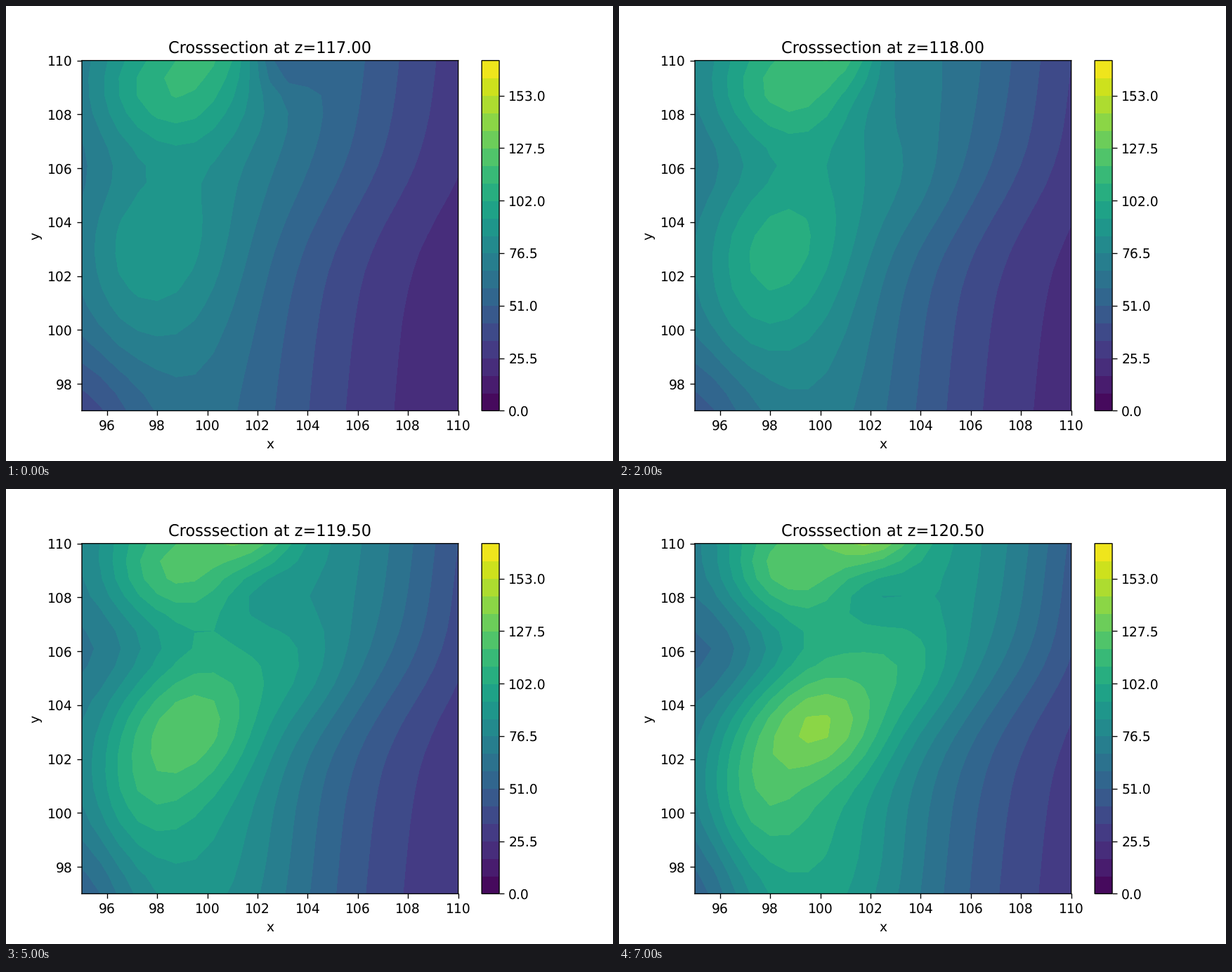
Animation, 864 px wide and 648 px high, one loop 8 s. Source, as a matplotlib script:

```python
import numpy as np
import matplotlib.pyplot as plt
from matplotlib.animation import FuncAnimation

Z_START, Z_STEP, FRAMES = 117, 0.5, 8
LEVELS = np.linspace(0, 170, 21)
X, Y = np.meshgrid(np.linspace(95, 110, 21), np.linspace(97, 110, 21))

# Thin, unsnapped lines and unhinted text
plt.rcParams.update({
    "path.snap": False,
    "text.hinting": "none",
    "axes.linewidth": 0.72,
    "xtick.major.width": 0.72,
    "ytick.major.width": 0.72,
})


def mix(a, b, t):
    return a + (b - a) * t


def bump(amp, x, y, sx, sy):
    return amp * np.exp(-0.5 * (((X - x) / sx) ** 2 + ((Y - y) / sy) ** 2))


def slope(s):
    """Smooth fall towards large x, its front bent to the right at large y."""
    dy = Y - 104.5
    front = mix(105.2, 106.7, s) + mix(1.3, 1.9, s) * np.tanh(dy / 2.5) + 0.08 * dy
    return mix(14, 20, s) + mix(66, 90, s) / (1 + np.exp((X - front) / 2.64))


def field(z):
    s = (z - Z_START) / (Z_STEP * (FRAMES - 1))
    late = s ** 2

    # Hills at the top and in the middle
    hills = (
        bump(mix(32, 21, s), 98.8, 109, mix(2.1, 1.5, s), mix(1.6, 1.1, s))
        + bump(mix(18, 38, s), mix(100.5, 102, s), 110.5, 1.3, 0.9)
        + bump(mix(19, 37, s), mix(98.2, 100.1, s), mix(103.4, 103.2, s),
               mix(2.2, 1.8, s), mix(2.7, 1.45, s))
    )
    # Shoulders that grow around the middle hill
    shoulders = (
        bump(20 * s, 97.2, 100.6, 1.6, 1.8)
        + bump(7 * s, 100.8, 98.6, 1.8, 1.8)
        + bump(13 * s, 103.5, 105.2, 1.5, 1.4)
    )
    # Left edge, left valley, lower left corner, then dips near the top
    hollows = (
        bump(mix(14, 38, late), 94.5, Y, mix(1.1, 1.6, s), 1)
        + bump(mix(9, 26, late), 96.8, 106, 1.8, 1.5)
        + bump(mix(30, 20, s), 95.5, 96.3, 2, 2.2)
        + bump(22 * max(0, 1 - 1.75 * s), 103, 110.2, 0.9, 0.9)
        + bump(12 * s, 102.3, 108, 1.2, 0.8)
        + bump(9 * s, 111, 109, 1.8, 3)
    )
    return slope(s) + hills + shoulders - hollows


def draw_section(z):
    ax.set_title(f"Crosssection at z={z:.2f}")
    return ax.contourf(X, Y, field(z), levels=LEVELS, vmin=0, vmax=170)


def update(n):
    global section
    section.remove()
    section = draw_section(Z_START + Z_STEP * n)
    return []


fig, ax = plt.subplots(figsize=(6.4, 4.8), dpi=135)
fig.subplots_adjust(bottom=106 / 960, top=845 / 960)
section = draw_section(Z_START)
fig.colorbar(section, ax=ax)
ax.set_xlabel("x")
ax.set_ylabel("y")

anim = FuncAnimation(fig, update, frames=FRAMES, interval=1000, repeat=True)
plt.show()
```
